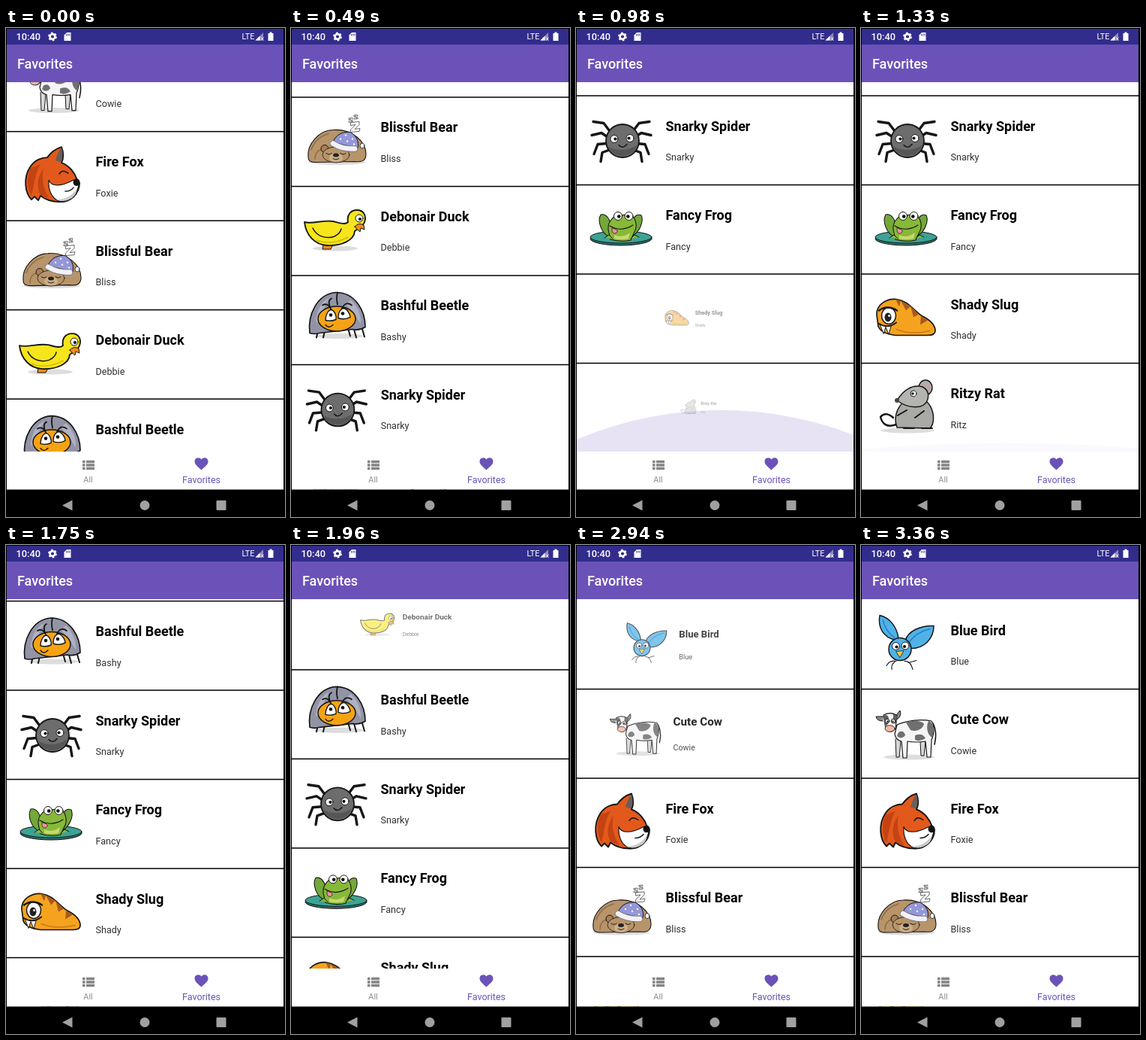
Recreate the animation shown at these times as an HTML page. Size 372x650 px, loop 3430 ms.

```html
<!DOCTYPE html>
<html lang="en">
<head>
<meta charset="utf-8">
<title>Favorites</title>
<style>
  html, body { margin: 0; width: 100%; height: 100%; overflow: hidden; background: #000; }
  svg { display: block; width: 372px; height: 650px; font-family: Roboto, sans-serif; }
  .title { font-size: 18px; font-weight: 700; }
  .name { font-size: 12.6px; fill: #303030; }
  .art { stroke: #161616; stroke-width: 1.5; stroke-linejoin: round; stroke-linecap: round; fill: none; }
  .flat { stroke: none; }
</style>
</head>
<body>
<svg viewBox="0 0 372 650">
  <rect width="372" height="650" fill="#fff"/>
  <g id="list"></g>
  <g id="glow"><circle cx="193" cy="1001" r="493" fill="#6b52b8" opacity=".16"/></g>

  <rect width="372" height="22" fill="#322d8c"/>
  <rect y="22" width="372" height="50" fill="#6b52b8"/>
  <g fill="#fff">
    <text x="13.5" y="16" font-size="12.8" font-weight="500">10:40</text>
    <circle cx="62" cy="11.5" r="3.4" fill="none" stroke="#fff" stroke-width="2.6"/>
    <circle cx="62" cy="11.5" r="5" fill="none" stroke="#fff" stroke-width="1.8" stroke-dasharray="2.6 2.64"/>
    <path d="M77.500 9.500L81 6H86.500V17H77.500Z"/>
    <path d="M80.500 8v2.500M82.700 7.500v3M84.800 7.500v3" stroke="#322d8c" stroke-width=".9"/>
    <text x="314.500" y="15.300" font-size="10.800">LTE</text>
    <path d="M332.500 16.500L343 6V16.500Z" opacity=".45"/>
    <path d="M332.500 16.500L338.500 10.500V16.500Z"/>
    <path d="M340 12.500l3.500 4M343.500 12.500l-3.500 4" stroke="#fff"/>
    <path d="M349.500 7H351.500V5.500H354.500V7H356.500V17H349.500Z"/>
    <text x="15" y="54" font-size="18" font-weight="500">Favorites</text>
  </g>

  <rect y="563" width="372" height="50.500" fill="#fff"/>
  <path d="M102 576.500h3.600m1.400 0h11M102 581h3.600m1.400 0h11M102 585.500h3.600m1.400 0h11" stroke="#858585" stroke-width="3.600"/>
  <text x="109.500" y="604.300" font-size="10.800" fill="#8a8a8a" text-anchor="middle">All</text>
  <path d="M260.500 587.500C254.500 582 251.500 579.800 251.500 576.300C251.500 571 257.800 569.800 260.500 573.500C263.200 569.800 269.500 571 269.500 576.300C269.500 579.800 266.500 582 260.500 587.500Z" fill="#6b52b8"/>
  <text x="260.500" y="604.500" font-size="12.500" fill="#6b52b8" text-anchor="middle">Favorites</text>

  <rect y="613.500" width="372" height="37" fill="#000"/>
  <g fill="#a0a0a0">
    <path d="M75 634.500L88.500 627.500V641.500Z"/>
    <circle cx="185" cy="634.500" r="6.500"/>
    <rect x="280.500" y="628" width="13" height="13" rx="1"/>
  </g>
  <path d="M0 0H372V650H370V1H1V650H0Z"/>
</svg>
<script>
const LOOP = 3430, STEP = 70, ROW = 118.5, TOP = 72.5, BOTTOM = 563, GROW = 400;

// Drawing helpers, in coordinates of one list row
const path = (d, fill = 'none', more = '') => `<path d="${d}" fill="${fill}" ${more}/>`;
const oval = (x, y, rx, ry, fill, more = '') =>
  `<ellipse cx="${x}" cy="${y}" rx="${rx}" ry="${ry}" fill="${fill}" ${more}/>`;
const flat = 'class="flat"';
const thick = w => `stroke-width="${w}"`;
const shadow = (x, y, rx) => oval(x, y, rx, 3.5, '#ddd', flat);
const eye = (x, y, r, px = 0, py = 0) =>
  oval(x, y, r, r, '#fff', thick(1)) + oval(x + px, y + py, r * .42, r * .42, '#111', flat);
const zed = (x, y, size) => path('M1 1L12 0L12 4L6 10L13 9L12 13L0 14L1 10L7 4L1 5Z', '#fff',
  `transform="translate(${x} ${y}) scale(${size})" stroke="#444" stroke-width="${.8 / size}"`);

const bird =
  path('M46 54C30 50 22 38 25 21C38 24 48 36 50 52Z', '#4fb2e8') +
  path('M59 55C62 42 80 34 97 35C97 52 84 66 65 65Z', '#4fb2e8') +
  path('M29 27C32 40 38 46 45 51M92 39C80 42 70 48 64 57', 'none', 'stroke="#2b7fc0"') +
  oval(52, 66, 15, 15, '#4fb2e8') +
  eye(46.500, 62, 5, 1, 1) + eye(59, 61.500, 5, -1, 1) +
  path('M47 69L57 68L52 77Z', '#f5c93b', thick(.8)) +
  path('M47 82Q38 80 34 88M45 83Q40 86 41 93M58 82Q66 81 69 93M63 84L74 81', 'none', thick(1.100));

const cow = shadow(64, 91, 34) +
  path('M96 46Q102 58 98 74', 'none', thick(1.600)) +
  path('M46 67L47 91H51L53 70M79 70L80 89H84L86 70', '#d8d8d8', thick(1)) +
  path('M48 48C62 42 80 40 94 43C99 50 97 62 94 68L93 91H88L86 70Q74 72 62 70L61 92H56L54 70Q46 68 45 60Z', '#f5f5f5', thick(1.200)) +
  path('M60 45C70 41 82 43 84 47C82 54 74 58 66 55ZM90 43C97 44 98 56 95 65C89 62 86 52 90 43ZM50 58Q57 54 59 62Q54 68 48 63ZM72 62Q82 58 86 66Q78 71 72 68Z', '#707070', flat) +
  path('M30 37L20 37Q21 43 29 43M46 36L52 29Q55 36 48 41', '#888', thick(1)) +
  path('M30 35C36 32 43 32 48 36L46 53Q40 61 33 53Z', '#f5f5f5', thick(1.200)) +
  path('M30 36Q36 33 37 40Q37 49 32 50ZM43 34L48 36L47 49Q42 44 43 34Z', '#606060', flat) +
  eye(35, 43, 2.800, .5, .5) + eye(43, 43, 2.800, -.5, .5) +
  oval(38.500, 53, 6.500, 4.300, '#f3b7a6', thick(.8));

const fox =
  path('M74 21C77 29 77 36 74 42C85 46 92 56 95 65L98 69C98 83 86 95 71 94C59 94 51 90 46 86L43 92L38 87L34 91C25 82 23 62 32 48C38 38 48 35 55 35C60 28 67 23 74 21Z', '#e3591b', thick(1.900)) +
  path('M74 22C76 29 76 36 73 41L66 39C68 32 70 26 74 22Z', '#665f60', flat) +
  path('M33 49C27 62 28 76 34 86C38 73 37 60 46 44ZM46 85C40 74 42 60 50 50C47 64 50 78 58 90Z', '#c44312', flat) +
  path('M57 65C60 74 74 74 90 65L97 69C97 82 85 94 71 93C61 90 56 78 57 65Z', '#fff', thick(1.200)) +
  path('M66 91Q84 92 95 76Q94 87 84 91Q76 95 66 91Z', '#ccc', flat) +
  oval(94, 68, 4.500, 4.800, '#111', flat) +
  path('M71 57Q75 50 83 56M79 80Q86 80 90 75', 'none', thick(1.500));

const bear = shadow(61, 87, 38) +
  path('M23 80C21 63 38 44 56 44C82 42 100 60 100 76C100 86 93 87 85 86L34 87C27 87 23 86 23 80Z', '#b8946a', thick(1.100)) +
  path('M27 70Q33 54 50 49M32 83Q32 73 40 70', 'none', 'stroke="#8f6c45"') +
  oval(45, 69, 5, 5, '#a98057', thick(1)) +
  oval(60, 77, 18, 10.500, '#b8946a', thick(.8)) +
  oval(60, 81, 9, 5.500, '#cfb088', flat) +
  oval(60, 77.500, 4, 2.500, '#222', flat) +
  path('M47 75Q51 78 54 75M66 75Q70 78 73 75M56 82Q60 85 64 82', 'none', thick(1)) +
  path('M56 60C60 49 71 46 79 47C88 52 91 60 89 68Z', '#9497d8', thick(1)) +
  path('M56 62Q69 70 85 69', 'none', 'stroke="#777" stroke-width="8"') +
  path('M56 62Q69 70 85 69', 'none', 'stroke="#f1f1fa" stroke-width="6.500"') +
  oval(95, 65, 3, 3.500, '#f1f1fa', thick(.8)) +
  [[66, 56], [73, 51], [75, 59], [82, 56], [84, 63]].map(([x, y]) => oval(x, y, 1.200, 1.200, '#fff', flat)).join('') +
  zed(79, 33, 1) + zed(77, 28, .42) + zed(84, 24, .4);

const duck = shadow(59, 83, 30) +
  path('M43 78L42 84L53 84L56 78Z', '#f28c20', thick(1)) +
  path('M18 48C28 51 42 45 56 47C64 49 72 52 76 48C74 38 80 32 88 32C97 32 101 40 98 48C95 56 88 57 85 60C84 72 68 80 48 79C32 78 20 66 18 48Z', '#f6e51b', thick(1.900)) +
  path('M29 56C34 67 47 71 58 67Q66 63 67 57', 'none', thick(1.500)) +
  path('M34 72Q54 80 76 68', 'none', 'stroke="#cdb90f"') +
  eye(91, 43, 5, 1, 1) +
  path('M85 54Q90 48 97 52L98 58L93 56L92 61Q88 58 85 54Z', '#f28c20', thick(1));

const beetle = shadow(64, 81, 33) +
  path('M36 73L34 83M45 74L43 83M84 72L87 83M94 68L98 82M77 74L79 81', 'none', thick(2)) +
  path('M25 77C22 54 34 25 60 23C86 23 99 48 99 69Q91 74 82 72L38 77Q31 79 25 77Z', '#9294a6', thick(1.700)) +
  path('M33 62Q35 38 51 30Q41 45 40 64ZM80 33Q94 47 93 65Q85 52 73 38Z', '#b0b1c2', flat) +
  oval(61, 58, 25, 16.500, '#f6a313', thick(1.500)) +
  path('M62 23Q60 30 62 39M53 45Q49 36 42 40M68 44Q73 34 81 40M53 45Q48 34 54 31', 'none', thick(1.800)) +
  path('M46 60C46 52 50 46 54 46C59 48 61 56 60 59Q53 62 46 60ZM63 57C63 48 67 44 71 44C76 46 79 53 79 56Q71 60 63 57Z', '#fff', thick(1.400)) +
  oval(53, 53, 2.300, 2.300, '#111', flat) + oval(69, 51, 2.300, 2.300, '#111', flat) +
  path('M46 66Q50 72 56 66', 'none', thick(1.400));

const legs = 'M46 49L37 37L23 35M43 56L34 50L21 53M41 64L29 65L24 78M46 72L35 76L33 88';
const spider =
  path(legs, 'none', thick(3.400)) +
  `<g transform="matrix(-1 0 0 1 121 0)">${path(legs, 'none', thick(3.400))}</g>` +
  oval(62, 60.500, 22, 22, '#6d6d6d', thick(1.800)) +
  path('M43 68Q48 80 62 80.500Q76 80 82 66Q62 78 43 68Z', '#565656', flat) +
  eye(51, 58, 5, 1.500, 0) + eye(72, 57, 5, -1.500, 0) +
  path('M57 66Q62 72 68 65', 'none', thick(1.500));

const frog =
  oval(60, 72, 41, 9, '#2c6f66', thick(1)) + oval(60, 70, 41, 8, '#3da394', thick(1)) +
  path('M44 69C34 65 28 49 33 40Q43 38 47 55M76 68C84 63 91 50 87 41Q78 37 74 53', '#74a83a', thick(1.100)) +
  path('M43 60C42 50 49 43 55 41L72 40C80 44 83 56 77 65L73 74Q60 77 46 73Z', '#86b938', thick(1.100)) +
  path('M51 67Q62 72 72 64L70 72Q60 74 51 72Z', '#c7d96d', flat) +
  eye(56, 42, 5.500, 1.200, .5) + eye(70.500, 42, 5.500, -1.200, .5) +
  path('M45 55Q60 64 76 54', 'none', thick(1.200)) +
  path('M48 58Q47 66 53 65Q57 62 54 60Z', '#ef8fa0', thick(.7)) +
  path('M38 71L44 67L49 72M73 72L78 67L84 70', '#86b938', thick(1));

const slug =
  path('M21 55C20 41 34 33 47 34C63 36 70 49 81 56C91 61 99 67 99 76Q99 82 89 82H46C38 81 26 78 23 70Z', '#f5a31f', thick(1.700)) +
  path('M53 36L60 49L66 43ZM66 43L70 58L77 54ZM80 56L79 68L89 62ZM46 34L51 44L53 36Z', '#a95b1c', flat) +
  path('M47 74Q66 82 92 76', 'none', 'stroke="#c97912"') +
  path('M25 67L30 80L33 71L37 81L40 70', '#fff', thick(1)) +
  path('M23 66Q36 74 47 65', 'none', thick(2)) +
  oval(37, 56, 9.500, 11, '#fff', thick(1.500)) + oval(36, 58, 4.500, 6, '#222', flat) +
  path('M24 49Q35 41 48 49', 'none', thick(2.500)) + oval(37.500, 56, 1.500, 1.500, '#fff', flat);

const rat = shadow(62, 90, 36) +
  path('M47 82Q30 88 26 72Q33 64 43 73', 'none', thick(2.500)) +
  path('M48 86C42 70 51 52 63 50L88 52C98 62 99 80 92 87Z', '#a9a9a6', thick(1.500)) +
  oval(86, 33, 9, 10, '#b8aaa8') +
  path('M48 50C56 37 68 28 82 32C94 38 91 55 79 58Q62 61 48 50Z', '#b4b4b0', thick(1.500)) +
  eye(70, 41, 4, -1, 0) + oval(48, 50, 3, 3, '#444', flat) +
  path('M61 63L49 70M84 64L72 73M57 87H71M81 87H95', 'none', thick(2));

const items = [
  ['Blue Bird', 'Blue', bird], ['Cute Cow', 'Cowie', cow], ['Fire Fox', 'Foxie', fox],
  ['Blissful Bear', 'Bliss', bear], ['Debonair Duck', 'Debbie', duck],
  ['Bashful Beetle', 'Bashy', beetle], ['Snarky Spider', 'Snarky', spider],
  ['Fancy Frog', 'Fancy', frog], ['Shady Slug', 'Shady', slug], ['Ritzy Rat', 'Ritz', rat]
];

// Scroll offset as [time, offset], joined by monotone cubics
const keys = [
  [0, 172.4], [300, 300], [550, 345], [700, 361.5], [803, 457.5], [835, 576], [868, 694],
  [1500, 694], [1750, 591], [2030, 474], [2250, 415], [2450, 391.5], [2535, 355],
  [2641, 237.5], [2678, 119], [2725, 0], [LOOP, 0]
];
const slopes = keys.slice(1).map(([t, s], i) => (s - keys[i][1]) / (t - keys[i][0]));
const tangent = i => {
  const a = slopes[i - 1], b = slopes[i];
  if (a === undefined || b === undefined) return a ?? b;
  return a * b > 0 ? 2 * a * b / (a + b) : 0;
};

function scrollAt(t) {
  const i = Math.max(0, keys.findIndex(k => k[0] > t) - 1);
  const [t0, s0] = keys[i], [t1, s1] = keys[i + 1];
  const h = t1 - t0, u = (t - t0) / h, v = 1 - u;
  return s0 * (1 + 2 * u) * v * v + s1 * u * u * (3 - 2 * u) +
    h * u * v * (tangent(i) * v - tangent(i + 1) * u);
}

const list = document.getElementById('list');
list.innerHTML = items.map(([title, name, art]) => `<g>
  <g><g class="art">${art}</g>
    <text class="title" x="119.500" y="47">${title}</text>
    <text class="name" x="119.500" y="86.500">${name}</text></g>
  <rect y="118.300" width="372" height="1.500"/></g>`).join('');
const rows = [...list.children];
const glow = document.getElementById('glow');

const rowTop = (i, t) => TOP + i * ROW - scrollAt(t);
const visible = (i, t) => {
  const y = rowTop(i, t);
  return y < BOTTOM && y + ROW > 72;
};

// Times at which each row comes into view
const entries = items.map((_, i) => {
  const times = [-GROW];
  for (let t = 1; t < LOOP; t++) if (visible(i, t) && !visible(i, t - 1)) times.push(t);
  return times;
});

const clamp = x => Math.min(1, Math.max(0, x));
const ease = x => (1 - Math.cos(Math.PI * clamp(x))) / 2;

function draw(now) {
  const t = Math.floor(now % LOOP / STEP) * STEP;
  rows.forEach((row, i) => {
    const entered = entries[i].filter(e => e <= t).pop();
    const k = ease((t - entered) / GROW);
    row.setAttribute('transform', `translate(0 ${rowTop(i, t)})`);
    row.firstElementChild.setAttribute('transform',
      `translate(185.5 59.25) scale(${k}) translate(-185.5 -59.25)`);
    row.firstElementChild.setAttribute('opacity', k);
  });
  const g = clamp((t - 868) / 112) * clamp((1600 - t) / 600) ** 2;
  glow.setAttribute('transform', `translate(0 ${BOTTOM}) scale(1 ${g}) translate(0 ${-BOTTOM})`);
  glow.setAttribute('opacity', g);
}

const start = performance.now();
(function tick() {
  draw(performance.now() - start);
  requestAnimationFrame(tick);
})();
</script>
</body>
</html>
```
